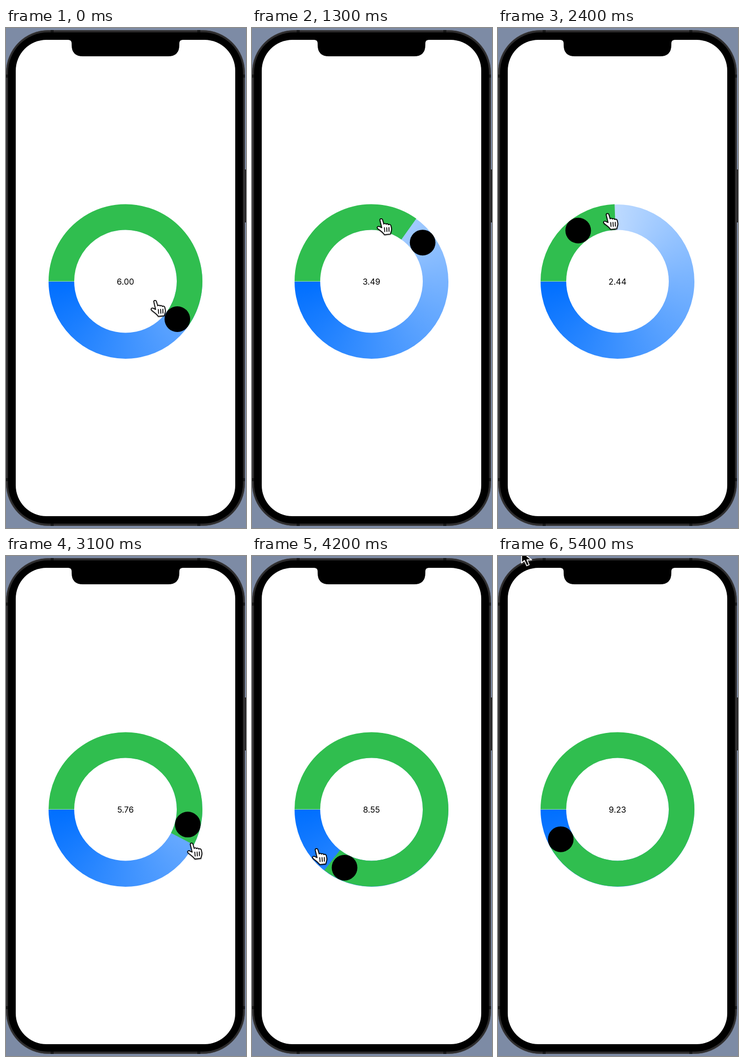
An HTML page for the animation above (5.5 s loop, 468x972 px).

```html
<!DOCTYPE html>
<html lang="en">
<head>
<meta charset="utf-8">
<title>Ring slider</title>
<style>
  html, body { margin: 0; width: 100%; height: 100%; overflow: hidden; background: #7d8ba5; }
  #stage { position: relative; width: 468px; height: 972px; overflow: hidden; }
  svg { position: absolute; left: 0; top: 0; display: block; }
  #track {
    position: absolute; left: 83px; top: 342.5px; width: 300px; height: 300px;
    border-radius: 50%;
    background: conic-gradient(from 270deg, #fff, #78b3ff 50%, #006fff);
  }
  text { font: 16px Inter, "Liberation Sans", sans-serif; text-anchor: middle; }
</style>
</head>
<body>
<div id="stage">
  <svg width="468" height="972" viewBox="0 0 468 972">
    <rect width="468" height="972" fill="#7d8ba5"/>
    <rect x="465" y="275" width="3" height="103" fill="#1c1c1d"/>
    <rect x="0.5" y="4.5" width="465" height="963" rx="82" fill="#2d2c2d" stroke="#434244"/>
    <path d="M0 93.5H5M461 93.5H466M0 878H5M461 878H466M90 4V9M376 4V9M90 963V968M376 963V968"
      stroke="#171717" stroke-width="6"/>
    <rect x="4" y="8.5" width="458" height="955" rx="78"/>
    <rect x="19" y="23" width="428" height="926" rx="60" fill="#fff"/>
    <path d="M121 22.5V23Q128 23 128 30V33Q128 55 150 55H316Q338 55 338 33V30Q338 23 345 23V22.5Z"/>
  </svg>
  <div id="track"></div>
  <svg width="468" height="972" viewBox="0 0 468 972">
    <circle cx="233" cy="492.5" r="100" fill="#fff"/>
    <path id="arc" fill="none" stroke="#30be4f" stroke-width="50"/>
    <text id="label" x="233" y="498.7"></text>
    <circle id="knob" r="25"/>
    <g id="hand" stroke="#000" stroke-linejoin="round" stroke-linecap="round"
      style="filter:drop-shadow(0 1.5px 1px rgba(0,0,0,.4))">
      <path fill="#fff" stroke-width="1.7" d="M-2.8 2C-2.6 -.8 1.4 -1 2.2 1.6L4.8 10.2C5.6 8.4 8.8 8.6 9.2 10.6
        C10.4 9 13.3 9.4 13.7 11.5C15.4 10.2 18.3 10.9 18.7 13.4L19.8 19C20.2 23 18.4 25 17.8 29.5L6 30.8
        C3.5 26.5 -2 23 -6.3 19.6C-9.4 17.2 -7.8 13.9 -4.4 14.8L.8 17.3Z"/>
      <path fill="none" stroke-width="1.7" d="M6 17.2L6.6 25M10.4 17L10.9 24.8M14.8 16.8L15 24.4"/>
    </g>
    <path id="arrow" stroke="#fff" stroke-width="1.8" stroke-linejoin="round"
      d="M0 0V21.5L5.5 16.8L10 27L14.8 25L10.5 15.5H19.5Z"/>
  </svg>
</div>
<script>
const LOOP = 5500, STEP = 100, LAG = 150;
const CX = 233, CY = 492.5, R = 125;
const EXIT = { from: 4700, to: 5400, x: 46, y: -8 };

const $ = id => document.getElementById(id);
const arc = $('arc'), label = $('label'), knob = $('knob'), hand = $('hand'), arrow = $('arrow');

// Monotone cubic through [time, value] points
function curve(pts) {
  const n = pts.length;
  const slope = i => (pts[i + 1][1] - pts[i][1]) / (pts[i + 1][0] - pts[i][0]);
  const tan = pts.map((_, i) => {
    if (i === 0 || i === n - 1) return 0;
    const a = slope(i - 1), b = slope(i);
    return a * b <= 0 ? 0 : 2 * a * b / (a + b);
  });
  return t => {
    if (t <= pts[0][0]) return pts[0][1];
    if (t >= pts[n - 1][0]) return pts[n - 1][1];
    let i = 0;
    while (t >= pts[i + 1][0]) i++;
    const h = pts[i + 1][0] - pts[i][0], u = (t - pts[i][0]) / h, w = 1 - u;
    return w * w * (1 + 2 * u) * pts[i][1] + u * w * w * h * tan[i]
      + u * u * (3 - 2 * u) * pts[i + 1][1] - u * u * w * h * tan[i + 1];
  };
}

const value = curve([[0, 6], [700, 6], [1150, 3.97], [1300, 3.49], [1600, 2.2], [1900, 1.05],
  [2050, 0.85], [2250, 1.45], [2400, 2.44], [2950, 5.38], [3100, 5.76], [4050, 8.19],
  [4200, 8.55], [4600, 9.23]]);
const aim = curve([[0, 5.91], [600, 5.92], [1300, 2.75], [1700, 1.1], [1980, 0.6],
  [2400, 2.27], [3100, 5.75], [4200, 9.01], [4500, 9.25]]);
const reach = curve([[0, 69], [500, 122], [1300, 123], [1900, 120], [2400, 133],
  [3100, 145], [4200, 131.5], [4500, 127]]);

// Dial runs clockwise from the left, ten units per turn
function polar(v, r) {
  const a = Math.PI * (1 + v / 5);
  return [CX + r * Math.cos(a), CY + r * Math.sin(a)];
}

function cursor(t) {
  const [x, y] = polar(aim(t), reach(t));
  const u = Math.min(1, Math.max(0, (t - EXIT.from) / (EXIT.to - EXIT.from)));
  const e = u * u * (3 - 2 * u);
  return [x + (EXIT.x - x) * e, y + (EXIT.y - y) * e];
}

function draw(t) {
  const v = value(t);
  const [ex, ey] = polar(v, R);
  arc.setAttribute('d', `M${CX - R} ${CY}A${R} ${R} 0 ${v > 5 ? 1 : 0} 1 ${ex} ${ey}`);
  label.textContent = v.toFixed(2);

  const [kx, ky] = polar(value(t - LAG), R);
  knob.setAttribute('cx', kx);
  knob.setAttribute('cy', ky);

  const [x, y] = cursor(t);
  const inside = x > 19 && y > 23;
  hand.setAttribute('visibility', inside ? 'visible' : 'hidden');
  arrow.setAttribute('visibility', inside ? 'hidden' : 'visible');
  (inside ? hand : arrow).setAttribute('transform', `translate(${x} ${y})`);
}

const start = performance.now();
function tick() {
  const t = (performance.now() - start) % LOOP;
  draw(Math.floor(t / STEP) * STEP);
  requestAnimationFrame(tick);
}
tick();
</script>
</body>
</html>
```
